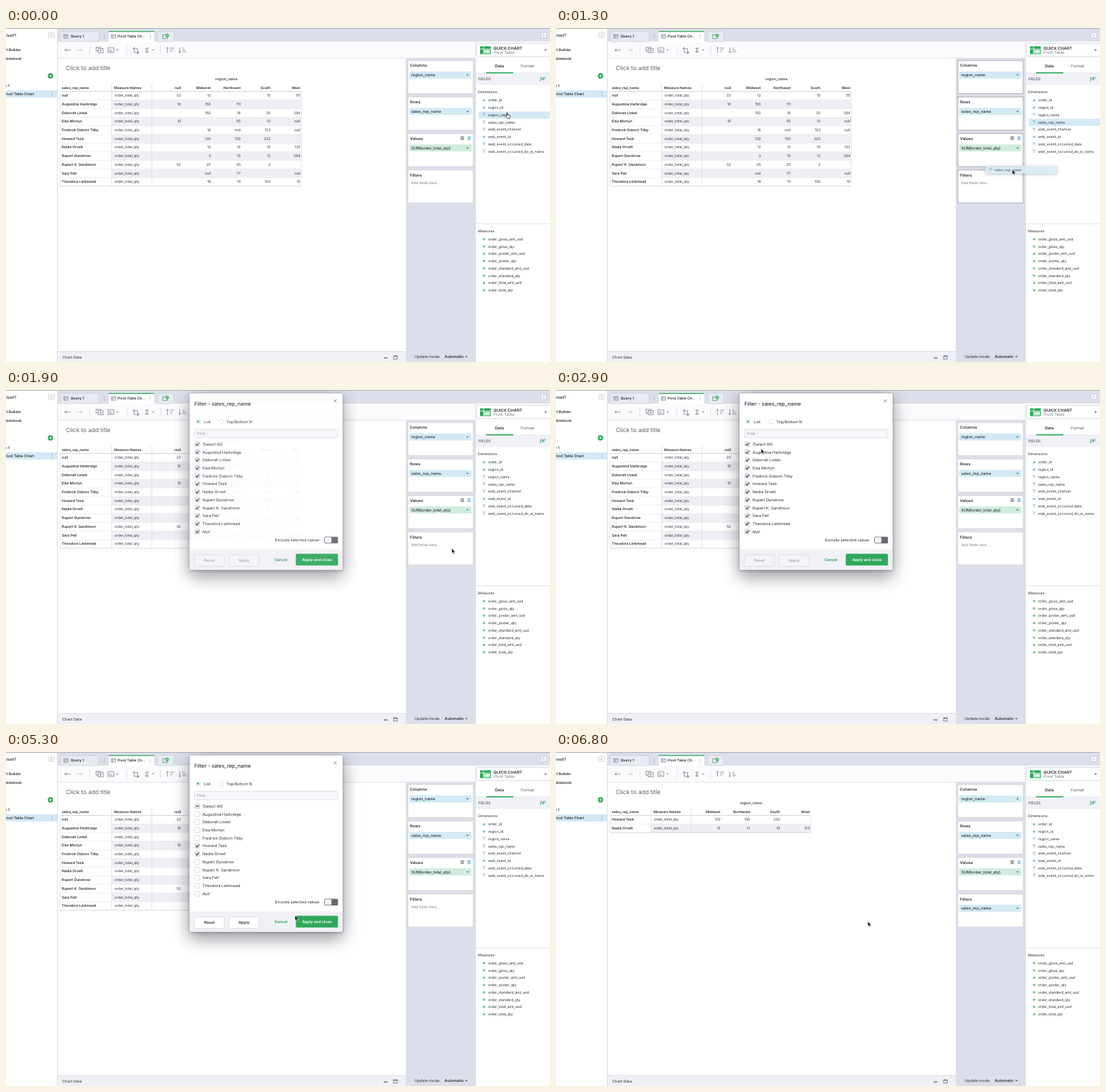
Animation, 800 px wide and 492 px high, one loop 7000 ms. Source, as an HTML page:

```html
<!DOCTYPE html>
<html lang="en">
<head>
<meta charset="utf-8">
<title>Pivot table filter</title>
<style>
html, body { margin: 0; width: 100%; height: 100%; overflow: hidden; background: #fff; }
svg { display: block; width: 800px; height: 492px; }
text { font-family: Inter, sans-serif; text-rendering: geometricPrecision; white-space: pre; }
</style>
</head>
<body>
<svg id="stage" viewBox="0 0 800 492" xmlns="http://www.w3.org/2000/svg"></svg>
<script>
const INK = '#2b2c35', GREY = '#777985', GREEN = '#2fa85a', BLUE = '#d3e9f3', LINE = '#d3d5df', PANEL = '#dcdfe9';

// Drawing helpers; every text is placed by its vertical centre.
const text = (x, y, s, size = 5.2, o = {}) =>
  `<text x="${x}" y="${(y + size * 0.36).toFixed(2)}" font-size="${size}" font-weight="${o.w || 400}"` +
  ` fill="${o.c || INK}" text-anchor="${o.a || 'start'}"${o.i ? ' font-style="italic"' : ''}>${s}</text>`;
const box = (x, y, w, h, fill, extra = '') =>
  `<rect x="${x}" y="${y}" width="${w}" height="${h}" fill="${fill}" ${extra}/>`;
const path = (d, c = '#6b6d78', w = 0.7, fill = 'none') =>
  `<path d="${d}" stroke="${c}" stroke-width="${w}" fill="${fill}"/>`;
const dot = (x, y, r, fill, extra = '') => `<circle cx="${x}" cy="${y}" r="${r}" fill="${fill}" ${extra}/>`;
const caret = (x, y, c = '#444651') => path(`M${x - 1.7} ${y - 0.8}l1.7 1.7 1.7-1.7z`, c, 0.2, c);
const dots = (x, y) => [-2.2, 0, 2.2].map(d => dot(x, y + d, 0.55, '#777985')).join('');
const group = (id, body, extra = '') => `<g id="${id}" ${extra}>${body}</g>`;
const frame = c => `stroke="${c}" stroke-width=".7"`;

const tabIcon = (x, y) =>
  box(x, y - 2.6, 6, 5.2, 'none', frame('#6b6d78')) + path(`M${x} ${y - 0.8}h6M${x + 2} ${y - 0.8}v3.4`, '#6b6d78', 0.6);
const collapse = (x, y, flip) =>
  box(x, y - 3.6, 8, 7.2, '#fff', 'rx="1" ' + frame('#b9bbc9')) +
  path(flip ? `M${x + 3} ${y - 1.6}l1.7 1.6-1.7 1.6` : `M${x + 5} ${y - 1.6}l-1.7 1.6 1.7 1.6`, '#666874', 0.7);

function sidebar() {
  const end = { a: 'end', w: 600 };
  return box(0, 0, 75.5, 492, '#fff') + path('M75.5 0V492', LINE, 0.8) +
    text(15, 10.5, 'Pivot?', 6.2, end) + collapse(63, 10.3) +
    text(22, 32, 'Chart Builder', 5.3, end) + text(23, 45, 'Notebook', 5.3, end) +
    dot(65.4, 70.5, 3.9, GREEN) + path('M63.4 70.5h4M65.4 68.5v4', '#fff', 0.8) +
    text(5, 85, 'Query 1', 5.3, end) +
    box(0, 91.8, 75, 10.6, BLUE) + text(41, 97.2, 'Pivot Table Chart', 5.3, end) + dots(67.5, 97);
}

function tabs() {
  return box(76, 0, 724, 20, PANEL) + box(0, 0, 800, 1, '#a8aab4') +
    box(80, 5, 57, 15, '#e8eaf1', 'rx="1.5" ' + frame('#c6c9d6')) +
    tabIcon(85, 12.4) + text(95, 12.5, 'Query 1', 5.4, { w: 600 }) + dots(144.5, 12.5) +
    box(151, 5, 67, 15.5, '#fff') + box(151, 4.6, 67, 1.3, GREEN) +
    tabIcon(155, 12.4) + text(164, 12.5, 'Pivot Table Ch...', 5.2, { w: 600 }) + dots(212.3, 12.5) +
    box(223, 5, 24, 15, '#e8eaf1', 'rx="1.5" ' + frame('#c6c9d6')) +
    box(230.5, 10, 7, 5.4, 'none', frame('#3c8d5c')) + dot(237, 11, 2.5, GREEN) +
    path('M235.7 11h2.6M237 9.7v2.6', '#fff', 0.6) + collapse(787, 10.3, true);
}

function toolbar() {
  const sort = (x, dir) => path(`M${x} 28.5v8`) +
    (dir > 0 ? path(`M${x - 1.8} 30.3l1.8-1.9 1.8 1.9`) : path(`M${x - 1.8} 34.7l1.8 1.9 1.8-1.9`)) +
    [0, 1, 2].map(k => path(`M${x + 4} ${29.5 + k * 2.7}h${dir > 0 ? 6 - k * 1.8 : 2.4 + k * 1.8}`)).join('');
  return box(76, 20, 614, 24, '#fbfbfd') + path('M76 44.3H690', LINE) +
    path('M95 32.5h-8.5m2.6-2.2l-2.6 2.2 2.6 2.2') + path('M104.5 32.5h8m-2.6-2.2l2.6 2.2-2.6 2.2', '#bbbdc8') +
    path('M123.5 26v13M178 26v13M227.3 26v13', LINE, 0.7) +
    box(132.5, 28.5, 7, 5.5, 'none', frame('#6b6d78')) + box(135.5, 30.5, 7.5, 6, '#fbfbfd', frame('#6b6d78')) +
    path('M137.5 33.5h3.5M139.2 31.8v3.5') +
    box(150, 29, 8.5, 7, 'none', frame('#6b6d78')) + path('M151.5 32h3M151.5 34h5') + caret(164, 32.5, '#8c8e99') +
    path('M188.5 28v8h7M186 30.3h7.5v8') + path('M194 34.5l1.8 1.5-1.8 1.5') +
    text(204.5, 32.5, 'Σ', 9, { c: '#5b5d67' }) + caret(216.5, 32.5, '#8c8e99') +
    sort(237.5, 1) + sort(255.5, -1) +
    text(88, 58.5, 'Click to add title', 8.65, { c: '#5b5d67' });
}

const SECTIONS = ['Columns', 'Rows', 'Values', 'Filters'];
const sectionY = i => 48 + i * 53.7;
const chip = (i, label, fill = BLUE) => {
  const y = sectionY(i) + 16;
  return box(593, y, 91.5, 10.4, fill, 'rx="1.5"') + text(596, y + 5.2, label, 5.7, { w: 500 }) + caret(678.8, y + 5.4, '#356f92');
};

function shelves() {
  const cards = SECTIONS.map((name, i) =>
    box(591, sectionY(i), 96, 48.7, '#fff', 'class="card" stroke-width=".8"') +
    text(594, sectionY(i) + 7.3, name, 5.9, { w: 600 })).join('');
  const grid = box(669, 160, 4, 4.6, 'none', frame('#555762')) + path('M669 162.3h4M671 160v4.6', '#555762', 0.6) +
    path('M678.7 160.4h4.4M678.7 162.4h4.4M678.7 164.4h4.4', '#2f9fd0', 1);
  return box(588, 44.3, 102.5, 448, PANEL) + cards + grid +
    chip(0, 'region_name') + chip(1, 'sales_rep_name') + chip(2, 'SUM(order_total_qty)', '#cfecdd') +
    group('hint', text(596, sectionY(3) + 19, 'Add fields here...', 5.2, { c: GREY })) +
    group('filterChip', chip(3, 'sales_rep_name')) +
    text(601, 484, 'Update mode:', 5.7) + text(645, 484, 'Automatic', 5.7, { w: 600 }) + caret(677, 484.3);
}

const DIMS = 'order_id region_id region_name sales_rep_name web_event_channel web_event_id web_event_occurred_date web_event_occurred_do_w_name'.split(' ');
const MEASURES = 'order_gloss_amt_usd order_gloss_qty order_poster_amt_usd order_poster_qty order_standard_amt_usd order_standard_qty order_total_amt_usd order_total_qty'.split(' ');
const ROW = 10.75;
const typeIcon = (x, y, name) => name.endsWith('_id')
  ? dot(x, y, 1.6, '#9ad0e0') + path(`M${x - 2} ${y}h4M${x} ${y - 2}v4`, '#62b1c9', 0.6)
  : path(`M${x - 2} ${y - 1.9}h4M${x} ${y - 1.9}v4.2`, '#75aac2', 0.8);

function fields() {
  const dims = DIMS.map((n, i) => typeIcon(703, 106.5 + i * ROW, n) + text(709, 106.6 + i * ROW, n, 5.2)).join('');
  const measures = MEASURES.map((n, i) => {
    const y = 311 + i * ROW;
    return dot(703, y, 1.8, '#9bdcb4') + path(`M701 ${y}h4M703 ${y - 1.9}v3.8`, '#43b573', 0.6) + text(709, y, n, 5.2);
  }).join('');
  return box(690.5, 20, 110, 472, '#fff') + path('M690.5 20V492', LINE) +
    box(692, 22.5, 112, 19.5, '#fff', 'rx="2" ' + frame('#c3c6d2')) +
    box(697, 27, 16, 11.5, GREEN, 'rx="1"') + path('M697 31h16M702.3 27v11.5', '#fff', 0.8) +
    box(703, 32, 9, 5.5, '#bfe6cc') + path('M703 34.7h9M707.5 32v5.5', '#fff', 0.7) +
    text(717, 29.4, 'QUICK CHART', 6, { w: 600 }) + text(717, 35.7, 'Pivot Table', 5.9, { c: GREY }) + caret(793.5, 32.5) +
    text(719, 55.7, 'Data', 5.9, { w: 600 }) + text(757, 55.7, 'Format', 5.9, { c: '#555762' }) +
    box(691, 66.5, 109, 17.5, '#f0f1f6') + path('M691 66.3h109', LINE, 0.6) + box(706, 65.2, 40, 1.7, GREEN) +
    text(694.5, 75.3, 'FIELDS', 5.4, { w: 500, c: '#555762' }) +
    text(785, 75, 'ƒx', 6.4, { c: '#249150', w: 600, i: 1 }) + dot(791.5, 73.6, 1.4, 'none', frame('#249150')) +
    text(694, 94.5, 'Dimensions', 5.25) + box(695, 0, 105, 10.6, BLUE, 'id="hover"') + dims +
    path('M691 288.4h109', LINE) + text(694, 299.2, 'Measures', 5.25) + measures;
}

const DATA = [
  ['null', '22,12,,10,55'],
  ['Augustina Harbridge', '10,150,111,,'],
  ['Deborah Linkel', ',150,16,25,294'],
  ['Elsa Mortyn', '10,,55,12,null'],
  ['Fredrick Osborn Tilby', ',16,null,123,null'],
  ['Howard Tesk', ',120,150,222,'],
  ['Nadia Orvelt', ',12,12,10,123'],
  ['Rupert Dunstrow', ',3,10,12,294'],
  ['Rupert K. Sandmoor', '52,25,25,2,'],
  ['Sara Pell', ',null,77,,null'],
  ['Theodora Larkmead', ',18,10,100,10']
].map(([name, cells]) => ({ name, cells: cells.split(',') }));
const REGIONS = ['null', 'Midwest', 'Northeast', 'South', 'West'];

// x1 and x2 are the column rules; skip drops leading region columns.
function table(rows, x1, x2, skip) {
  const regions = REGIONS.slice(skip), step = 43.9, pitch = 12.7;
  const colX = i => x2 + 42.7 + i * step;
  const right = colX(regions.length - 1) + 1.4, bottom = 93.4 + rows.length * pitch;
  const head = text((x2 + right) / 2, 74.8, 'region_name', 5.3, { a: 'middle', w: 500 }) +
    text(82, 88.2, 'sales_rep_name', 5.15, { w: 600 }) + text(x1 + 3.5, 88.2, 'Measure Names', 5.15, { w: 600 }) +
    regions.map((r, i) => text(colX(i), 88, r, 5.2, { a: 'end', w: 600 })).join('');
  const body = rows.map((r, k) => {
    const y = 93.4 + k * pitch, mid = y + 6;
    return (k % 2 ? box(x1, y, right - x1, pitch, '#eeeef5') : '') +
      path(`M79.5 ${y}H${right}`, '#dcdde7', 0.5) +
      text(82, mid, r.name, 5.2, { w: 600 }) + text(x1 + 4, mid, 'order_total_qty', 5.2) +
      r.cells.slice(skip).map((c, i) => c && text(colX(i), mid, c, 5.2, { a: 'end' })).join('');
  }).join('');
  return head + body + path(`M79.5 93.4H${right}M79.5 ${bottom}H${right}`, '#c9cbd9', 0.8) +
    path(`M79.5 93.4V${bottom}M${x1} 82V${bottom}M${x2} 82V${bottom}M${right} 93.4V${bottom}`, '#d6d8e3', 0.7);
}

const OPTIONS = ['(Select All)', ...DATA.slice(1).map(r => r.name), 'Null'];
const optionY = i => 79.8 + i * 11.72;

function dialog() {
  const list = OPTIONS.map((n, i) => {
    const y = optionY(i);
    return box(277.7, y - 3.6, 7.2, 7.2, '#fff', `id="box${i}" rx="1" ` + frame('#c8cad8')) +
      `<path id="mark${i}" fill="none" stroke="#33343d" stroke-width="1.1"/>` +
      text(289, y, n, 5.8, { i: n === 'Null' });
  }).join('');
  const button = (x, label) => box(x, 242.8, 44, 17, '#fff', 'class="btn" rx="1.5" ' + frame('#cfd1dc')) +
    `<g class="btnText">${text(x + 22, 251.2, label, 5.7, { a: 'middle', w: 600, c: 'currentColor' })}</g>`;
  return box(270, 5, 225, 260, '#fff', 'rx="2" style="filter:drop-shadow(0 9px 13px rgba(25,25,40,.36)) drop-shadow(0 1px 2px rgba(25,25,40,.4))"') +
    path('M270 235H495V263a2 2 0 0 1-2 2H272a2 2 0 0 1-2-2z', 'none', 0, '#f0f1f6') +
    text(277, 20.1, 'Filter - sales_rep_name', 7.5, { w: 500 }) + path('M481.8 13.8l4.6 4.6m0-4.6l-4.6 4.6', '#666874') +
    dot(282.5, 46.5, 3.3, '#fff', frame('#c3c6d4')) + dot(282.5, 46.5, 1.5, GREEN) + text(291, 46.5, 'List', 5.8) +
    dot(316.5, 46.5, 3.3, '#fff', frame('#d6d8e3')) + text(324, 46.5, 'Top/Bottom N', 5.8) +
    box(277.3, 58, 210.7, 12, '#f8f8fc', 'rx="1" ' + frame('#cfd1dc')) + text(281, 64, 'Find...', 5.7, { c: '#8d8f9b' }) +
    list + text(395.5, 221, 'Exclude selected values', 5.75) +
    box(468.2, 216.2, 20, 9.8, '#696873', 'rx="1.5"') + box(469, 217, 9.5, 8.2, '#f4f4f8', 'rx="1"') +
    button(277, 'Reset') + button(328, 'Apply') + text(404.3, 250.1, 'Cancel', 5.6, { a: 'middle', w: 600, c: '#23944f' }) +
    box(426.2, 241.2, 62, 17.2, GREEN, 'rx="1.5"') + text(457.3, 250, 'Apply and close', 5.65, { a: 'middle', w: 600, c: '#fff' });
}

const ghost = box(0, 0, 106, 11.5, '#d8ebf4', 'rx="2" opacity=".88" style="filter:drop-shadow(0 1px 2px rgba(40,50,80,.35))"') +
  typeIcon(8, 5.7, 'name') + text(14, 5.8, 'sales_rep_name', 5.2, { c: '#51535e' });
const arrow = path('M0 0V7.2L1.7 5.7 2.9 8.4 4.1 7.9 2.9 5.3H5.1Z', '#fff', 0.5, '#111');
const hand = path('M-.7 .6Q0-.5 .7 .6V3.4L3.4 4Q4.4 4.3 4.2 5.5L3.5 8.8H-.6L-2.6 5.7Q-2.5 4.6-1.4 5.2L-.7 5.8Z', '#222', 0.8, '#fff');

document.getElementById('stage').innerHTML =
  box(0, 0, 800, 492, '#fff') + sidebar() + toolbar() + tabs() +
  group('full', table(DATA, 155.5, 214.5, 0)) + group('filtered', table(DATA.slice(5, 7), 139.8, 199, 1)) +
  box(76, 476.5, 512, 15.5, '#eff0f5') + path('M76 476.5H588', LINE) + text(83, 485, 'Chart Data', 5.6) +
  path('M555.5 486h5.5', '#555762', 1.3) + box(570, 483, 5.5, 4.8, 'none', frame('#555762')) + path('M570 483.5h5.5', '#555762', 1) +
  shelves() + fields() + group('ghost', ghost) + group('dialog', dialog()) +
  group('cursor', group('arrow', arrow) + group('hand', hand));

const $ = id => document.getElementById(id);
const all = s => document.querySelectorAll(s);
const show = (id, on) => { $(id).style.display = on ? '' : 'none'; };

const LOOP = 7000;
const MOVES = [
  [0, 737, 124.5], [300, 737, 126], [700, 735.6, 138], [900, 735.6, 138], [1300, 671, 208.5], [1500, 656, 233],
  [2300, 655, 233.5], [3000, 281, 78], [3300, 281, 78], [3800, 308.5, 138], [4200, 308.5, 138],
  [4500, 308.5, 149.5], [4800, 309, 149.5], [5300, 425, 241], [5600, 458.6, 249.6], [LOOP, 458.6, 249.6]
];
const FADE = [[1600, 0], [1700, 0.3], [1800, 0.75], [1900, 0.93], [2000, 1], [5700, 1], [5800, 0.6], [5900, 0.2], [6000, 0], [LOOP, 0]];

function sample(keys, t, ease = u => u) {
  if (t <= keys[0][0]) return keys[0].slice(1);
  const i = keys.findIndex(k => k[0] > t), a = keys[i - 1], b = keys[i];
  const u = ease((t - a[0]) / (b[0] - a[0]));
  return a.slice(1).map((v, k) => v + (b[k + 1] - v) * u);
}
const smooth = u => u * u * (3 - 2 * u);

function mark(i, t) {
  const y = optionY(i);
  const tick = `M279.3 ${y}l1.6 1.7 2.7-3.5`;
  if (t < 3200) return tick;
  if (i === 0) return t >= 4100 ? `M279 ${y}h4.6` : '';
  return (i === 5 && t >= 4100) || (i === 6 && t >= 4600) ? tick : '';
}

function render(t) {
  const [x, y] = sample(MOVES, t, smooth);
  const pointing = t < 900 || (t >= 3000 && t < 4900) || (t >= 5500 && t < 6400);
  const dragging = t >= 900 && t < 1600;
  $('cursor').setAttribute('transform', `translate(${x} ${y})`);
  show('hand', pointing);
  show('arrow', !pointing);

  show('hover', t < 1600);
  $('hover').setAttribute('y', 122.9 + (t >= 900 || y > 133.4 ? ROW : 0));
  show('ghost', dragging);
  $('ghost').setAttribute('transform', `translate(${x - 40} ${y - 5.5})`);
  all('.card').forEach(c => {
    c.setAttribute('stroke', dragging ? '#555762' : '#cdd0dd');
    c.setAttribute('stroke-dasharray', dragging ? '1.2 1' : 'none');
  });

  const [alpha] = sample(FADE, t);
  show('dialog', alpha > 0);
  $('dialog').setAttribute('opacity', alpha);
  OPTIONS.forEach((_, i) => {
    const d = mark(i, t);
    $('mark' + i).setAttribute('d', d);
    $('box' + i).setAttribute('fill', d ? '#e3e5f0' : '#fff');
  });
  const enabled = t >= 3200;
  all('.btn').forEach(b => b.setAttribute('fill', enabled ? '#fff' : '#f4f4f8'));
  all('.btnText').forEach(b => { b.style.color = enabled ? INK : '#a3a5b0'; });

  const applied = t >= 5900;
  show('full', !applied);
  show('filtered', applied);
  show('filterChip', applied);
  show('hint', !applied);
}

let start, last = -1;
function tick(now) {
  start ??= now;
  const t = Math.floor(((now - start) % LOOP) / 100) * 100;
  if (t !== last) render(last = t);
  requestAnimationFrame(tick);
}
render(0);
requestAnimationFrame(tick);
</script>
</body>
</html>
```
